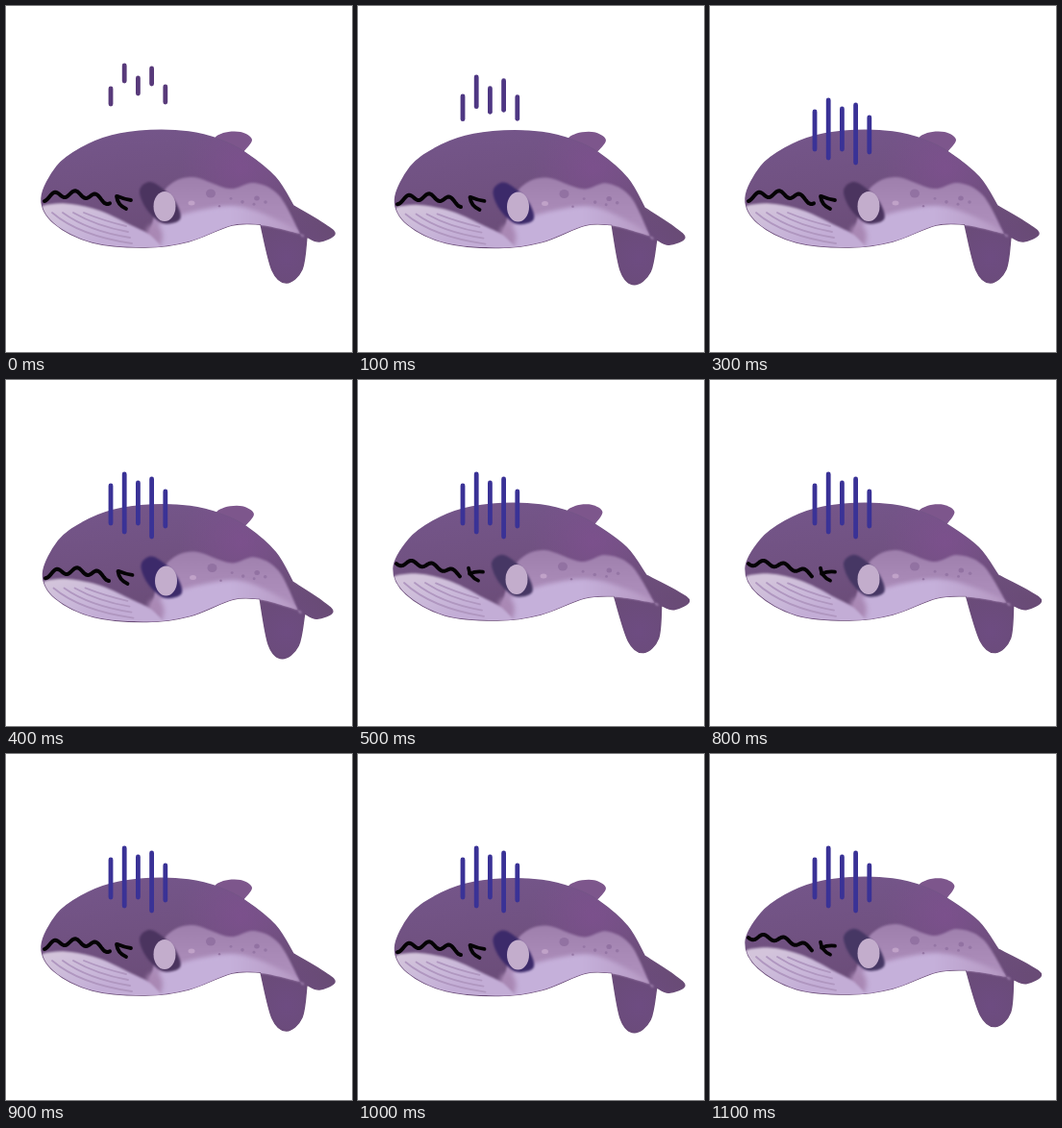
Recreate the animation shown at these times as an HTML page with a canvas. Size 360 px wide and 360 px high, loop 1200 ms.

```html
<!DOCTYPE html>
<html lang="en">
<head>
<meta charset="utf-8">
<title>Gloomy whale</title>
<style>
html, body { margin: 0; width: 100%; height: 100%; overflow: hidden; background: #fff; }
canvas { display: block; width: 360px; height: 360px; }
</style>
</head>
<body>
<canvas id="stage" width="360" height="360"></canvas>
<script>
const ctx = document.getElementById('stage').getContext('2d');
const STEP = 100, STEPS = 12, FALL = 3, TAU = Math.PI * 2;
const INK = '#050305';

// shift: whole head; chin: jaw drop; tilt and lift: tail swing; hinge: where the eye strokes meet
const poses = [
  { shift: [0, 0], chin: 0, tilt: 0, lift: 0, flipper: '#4b345f', hinge: 0,
    mouth: { from: 40, to: 108, top: 195.5, mid: 68, bow: 7, amp: 3.3, trough: 40 } },
  { shift: [1.5, 0.5], chin: 1, tilt: 0.045, lift: 0, flipper: '#3c2a6a', hinge: 0,
    mouth: { from: 41, to: 107, top: 198.5, mid: 70, bow: 7, amp: 3.3, trough: 42 } },
  { shift: [0, -1], chin: -3, tilt: -0.055, lift: -2, flipper: '#463764', hinge: 6,
    mouth: { from: 40, to: 106, top: 190.5, mid: 50, bow: 5, amp: 2.7, trough: 45 } }
];

// key points; a repeated point makes a corner
const outline = [[37,200],[53,167],[78,148],[110,135],[150,129.5],[190,131],[222,139],[248,152],[280,178],
  [299,208],[299,208],[328,225],[342,237],[326,245],[313,240],[313,240],[308,274],[292,288],[277,275],
  [265,227],[265,227],[235,228],[190,245],[145,251],[90,246],[50,226]];
const fin = [[218,140],[226,132],[244,131],[256,139],[247,152],[247,152]];
const patch = [[155,215],[168,188],[194,178],[232,190],[258,184],[284,197],[306,237],[306,237],
  [265,228],[235,231],[190,252],[150,260]];
const belly = [[158,229],[204,212],[250,210],[306,237],[265,240],[200,260],[158,260]];
const throat = [[36,212],[48,206],[68,206],[98,213],[130,228],[152,240],[160,258],[100,262],[44,240]];
const flipper = [[139,192],[149,183],[163,190],[177,205],[181,222],[163,226],[146,211]];

// first top, final top, final length
const streaks = [[86, 110, 39], [62, 98, 60], [75, 107, 42], [65, 103, 60], [84, 116, 36]];

const mix = (a, b, k) => a + (b - a) * k;
const clamp = v => Math.max(0, Math.min(1, v));

function bend(p, [x, y]) {
  const w = clamp((x - 225) / 55);
  const s = Math.sin(p.tilt), c = Math.cos(p.tilt);
  const dx = x - 250, dy = y - 190;
  const jaw = p.chin * clamp((160 - x) / 90) * clamp((y - 175) / 25) * clamp((250 - y) / 30);
  return [
    mix(x + p.shift[0], 250 + dx * c - dy * s, w),
    mix(y + p.shift[1] + jaw, 190 + dx * s + dy * c + p.lift, w)
  ];
}

function blob(pts) {
  const at = i => pts[(i + pts.length) % pts.length];
  const path = new Path2D();
  path.moveTo(...pts[0]);
  pts.forEach((b, i) => {
    const a = at(i - 1), c = at(i + 1), d = at(i + 2);
    path.bezierCurveTo(b[0] + (c[0] - a[0]) / 6, b[1] + (c[1] - a[1]) / 6,
      c[0] - (d[0] - b[0]) / 6, c[1] - (d[1] - b[1]) / 6, ...c);
  });
  return path;
}

function gradient(x0, y0, x1, y1, ...colors) {
  const g = ctx.createLinearGradient(x0, y0, x1, y1);
  colors.forEach((c, i) => g.addColorStop(i / (colors.length - 1), c));
  return g;
}

function fill(path, color, blur = 0) {
  ctx.filter = blur ? `blur(${blur}px)` : 'none';
  ctx.fillStyle = color;
  ctx.fill(path);
  ctx.filter = 'none';
}

function stroke(path, color, width) {
  ctx.strokeStyle = color;
  ctx.lineWidth = width;
  ctx.stroke(path);
}

function oval(p, x, y, rx, ry, color, blur) {
  const path = new Path2D();
  path.ellipse(...bend(p, [x, y]), rx, ry, 0, 0, TAU);
  fill(path, color, blur);
}

function arc(a, b, c) {
  const path = new Path2D();
  path.moveTo(...a);
  path.quadraticCurveTo(...b, ...c);
  return path;
}

function glow(x, y, r, color) {
  const g = ctx.createRadialGradient(x, y, 0, x, y, r);
  g.addColorStop(0, color);
  g.addColorStop(1, color.slice(0, 7) + '00');
  ctx.fillStyle = g;
  ctx.fillRect(x - r, y - r, 2 * r, 2 * r);
}

function spots(p) {
  let seed = 7;
  const rand = (lo, hi) => {
    seed = (seed * 16807) % 2147483647;
    return mix(lo, hi, seed / 2147483647);
  };
  oval(p, 193, 205, 3.5, 2.5, '#c0a2c8', 0.5);
  oval(p, 213, 195, 5, 4.5, '#9272a2', 0.7);
  oval(p, 261, 200, 2.8, 2.5, '#9272a2', 0.5);
  for (let i = 0; i < 5; i++) {
    const r = rand(1.2, 2);
    oval(p, 222 + i * 12, rand(198, 209), r, r, '#9576a5', 0.5);
  }
}

function folds(p) {
  for (let i = 0; i < 4; i++) {
    const pts = [[48 + 11 * i, 215], [76 + 9 * i, 239 - 5 * i], [131 - 2 * i, 247 - 6 * i]];
    stroke(arc(...pts.map(q => bend(p, q))), '#b097c0', 1.8);
  }
}

function mouth({ from, to, top, mid, bow, amp, trough }) {
  const path = new Path2D();
  for (let x = from; x <= to; x++) {
    const wave = amp * Math.cos(TAU * (x - trough) / 21.3);
    path.lineTo(x, top + bow * ((x - mid) / 36) ** 2 + wave);
  }
  stroke(path, INK, 4);
}

function eye(p) {
  const [x, y] = bend(p, [115, 198]);
  stroke(arc([x, y], [x + 1, y + 9], [x + 10, y + 13]), INK, 3.8);
  stroke(arc([x + 1, y + p.hinge], [x + 8, y + 3], [x + 15, y + 4]), INK, 3.8);
}

function whale(p) {
  const shape = pts => blob(pts.map(q => bend(p, q)));
  const body = shape(outline);
  const skin = gradient(150, 130, 165, 250, '#745589', '#705180', '#694b76');

  fill(shape(fin), '#7d568c');
  fill(body, skin);
  stroke(body, skin, 1.5);

  ctx.save();
  ctx.clip(body);
  glow(245, 168, 65, '#7f5090bb');
  glow(292, 262, 50, '#6e4c83dd');
  const side = shape(patch);
  fill(side, gradient(0, 180, 0, 245, '#9f80ad', '#aa8bb8', '#b193c0'), 0.9);
  ctx.save();
  ctx.clip(side);
  fill(shape(belly), gradient(160, 0, 306, 0, '#c5b0da', '#c5b0da', '#b598c2'), 2);
  ctx.restore();
  oval(p, 154, 240, 9, 13, '#a988b4', 2.5);
  fill(shape(throat), gradient(60, 207, 75, 252, '#d3c4db', '#cbbada', '#c3add6'), 1.2);
  folds(p);
  spots(p);
  ctx.restore();

  fill(shape(flipper), p.flipper, 0.8);
  oval(p, 165, 208.5, 11.5, 15.5, '#c3adcc', 0.7);
  mouth(p.mouth);
  eye(p);
}

function rain(step) {
  const k = clamp(step / FALL);
  const color = `rgb(${mix(88, 58, k)},${mix(58, 50, k)},${mix(122, 150, k)})`;
  streaks.forEach(([first, top, length], i) => {
    const x = 109 + 14.2 * i, y = mix(first, top, k);
    const path = new Path2D();
    path.moveTo(x, y);
    path.lineTo(x, y + mix(16, length, k));
    stroke(path, color, 4.8);
  });
}

function frame(now) {
  const step = Math.floor(now / STEP) % STEPS;
  ctx.fillStyle = '#fff';
  ctx.fillRect(0, 0, 360, 360);
  ctx.lineCap = ctx.lineJoin = 'round';
  whale(poses[step % poses.length]);
  rain(step);
}

const start = performance.now();
function tick() {
  frame(performance.now() - start);
  requestAnimationFrame(tick);
}
tick();
</script>
</body>
</html>
```
